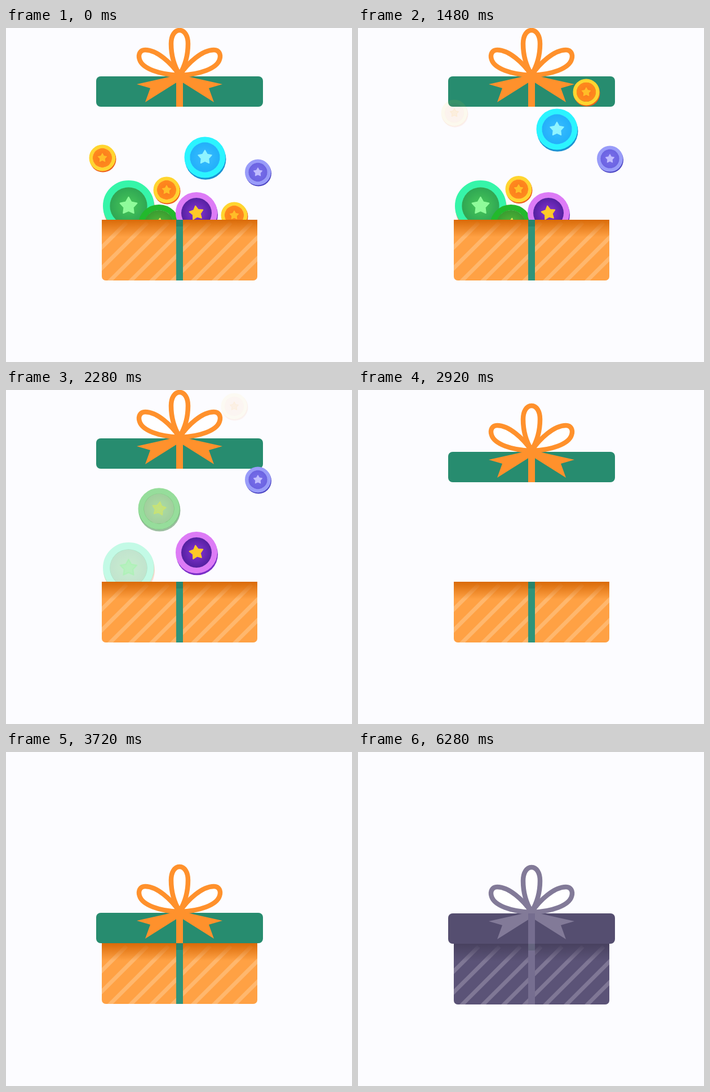
Animation, 614 px wide and 594 px high, one loop 9.08 s. Source, as an HTML page with a canvas:

```html
<!DOCTYPE html>
<html>
<head>
<meta charset="utf-8">
<style>
html, body { margin: 0; width: 100%; height: 100%; overflow: hidden; background: #fcfcff; }
canvas { display: block; }
</style>
</head>
<body>
<canvas id="stage" width="614" height="594"></canvas>
<script>
const ctx = document.getElementById('stage').getContext('2d');
const LOOP = 9080, STEP = 40, CENTER = 308;

// Colour pairs: bright gift, greyed-out gift
const PALETTE = {
  lid: ['#278c6f', '#554e70'], bow: ['#ff912c', '#827a98'], stem: ['#ff912c', '#756d8f'],
  box: ['#ffa144', '#5b5377'], shade: ['#d96a08', '#48415f'],
  stripe: ['#ffb76d', '#7f7795'], ribbon: ['#2f947a', '#766e90']
};

// Rim, ring, outer inner-disc, middle inner-disc, star
const ORANGE = ['#ee5f1c', '#ffd530', '#ff8a1c', '#fa7a20', '#ffbd28'];
const CYAN = ['#1b93d3', '#2bf4ff', '#22b0fa', '#3bbcff', '#8ff4ff'];
const VIOLET = ['#4d46c4', '#999cf9', '#6b63e2', '#7a70ea', '#c0bcff'];
const MINT = ['#f58a5a', '#36f5a9', '#2fa653', '#48c95a', '#8ffb9a'];
const GREEN = ['#2f7a35', '#22b92c', '#3a9c30', '#58bb3c', '#dcea58'];
const PURPLE = ['#7a2fc8', '#dd7bf6', '#5420a0', '#8a35d8', '#ffc928'];

// [skin, x, y, radius, tilt, rise, start, duration, fade start, fade end]
const COINS = [
  [MINT, 217.5, 316.5, 45.5, 0, 0, 0, 1, 2080, 2360],
  [GREEN, 271.5, 351, 37, 0.15, 145, 1500, 900, 2100, 2440],
  [PURPLE, 338, 329, 37, -0.15, 125, 1960, 800, 2480, 2800],
  [ORANGE, 285, 288, 23.5, 0, 120, 1420, 780, 1840, 2200],
  [CYAN, 353, 230, 36.5, 0, 107, 900, 1200, 1700, 2100],
  [ORANGE, 171, 231, 23.5, 0, 80, 120, 1380, 1120, 1510],
  [VIOLET, 447, 256.5, 23, 0, 97, 1080, 1140, 2300, 2720],
  [ORANGE, 405, 333, 23.5, 0, 304, 140, 2140, 1800, 2310]
];

const progress = (t, start, length) => Math.min(1, Math.max(0, (t - start) / length));
const easeInOut = p => p < 0.5 ? 2 * p * p : 1 - 2 * (1 - p) ** 2;
const easeOut = p => 1 - (1 - p) ** 3;

function mix([a, b], k) {
  const channel = (hex, i) => parseInt(hex.slice(i, i + 2), 16);
  return `rgb(${[1, 3, 5].map(i => Math.round(channel(a, i) * (1 - k) + channel(b, i) * k))})`;
}

function disc(x, y, r, fill) {
  ctx.fillStyle = fill;
  ctx.beginPath();
  ctx.arc(x, y, r, 0, 2 * Math.PI);
  ctx.fill();
}

function star(r, color) {
  ctx.beginPath();
  for (let i = 0; i < 10; i++) {
    const a = i * Math.PI / 5 - Math.PI / 2, d = i % 2 ? r * 0.54 : r;
    ctx.lineTo(d * Math.cos(a), d * Math.sin(a));
  }
  ctx.closePath();
  ctx.fillStyle = ctx.strokeStyle = color;
  ctx.lineWidth = r * 0.15;
  ctx.lineJoin = 'round';
  ctx.fill();
  ctx.stroke();
}

// Coins fade as a whole, so the rim is drawn as a crescent beneath the ring
function drawCoin(t, [skin, x, y, r, tilt, rise, start, duration, fadeFrom, fadeTo]) {
  const alpha = 1 - progress(t, fadeFrom, fadeTo - fadeFrom);
  if (!alpha) return;
  const [rim, ring, outer, middle, starColor] = skin;
  ctx.save();
  ctx.globalAlpha = alpha;
  ctx.translate(x, y - rise * easeInOut(progress(t, start, duration)));
  ctx.save();
  ctx.beginPath();
  ctx.rect(-2 * r, -2 * r, 4 * r, 4 * r);
  ctx.arc(0, 0, r - 0.5, 0, 2 * Math.PI);
  ctx.clip('evenodd');
  disc(1, r * 0.09, r, rim);
  ctx.restore();
  ctx.beginPath();
  ctx.arc(0, 0, r * 0.86, 0, 2 * Math.PI);
  ctx.strokeStyle = ring;
  ctx.lineWidth = r * 0.28;
  ctx.stroke();
  const glow = ctx.createRadialGradient(0, 0, 0, 0, 0, r * 0.73);
  glow.addColorStop(0, middle);
  glow.addColorStop(1, outer);
  disc(0, 0, r * 0.73, glow);
  ctx.rotate(tilt);
  star(r * 0.34, starColor);
  ctx.restore();
}

function drawBox(dy, color) {
  ctx.save();
  ctx.translate(0, dy);
  ctx.beginPath();
  ctx.roundRect(170, 341, 276, 108, [0, 0, 7, 7]);
  ctx.clip();
  ctx.fillStyle = color('box');
  ctx.fillRect(170, 341, 276, 108);

  ctx.strokeStyle = color('stripe');
  ctx.lineWidth = 7;
  ctx.beginPath();
  for (let sum = 560; sum < 890; sum += 37) {
    ctx.moveTo(sum - 460, 460);
    ctx.lineTo(sum - 346, 346);
  }
  ctx.stroke();

  const shade = ctx.createLinearGradient(0, 341, 0, 372);
  shade.addColorStop(0, color('shade'));
  shade.addColorStop(1, color('shade').replace('rgb', 'rgba').replace(')', ',0)'));
  ctx.fillStyle = shade;
  ctx.fillRect(170, 341, 276, 31);

  ctx.fillStyle = color('ribbon');
  ctx.fillRect(302, 341, 12, 108);
  ctx.fillStyle = 'rgba(0,40,20,0.15)';
  ctx.fillRect(302, 341, 12, 12);
  ctx.restore();
}

const LOOP_TOP = new Path2D('M308 83C300 70 293 50 293 28C293 14 299 4 308 4C317 4 323 14 323 28C323 50 316 70 308 83Z');
const LOOP_SIDE = new Path2D('M308 84C293 62 268 39 247 39C238 39 234 47 237 56C242 72 272 83 308 84Z');
const TAIL = new Path2D('M308 83L232 100L256 107L247 132L304 96Z');

function drawLid(dy, color) {
  ctx.save();
  ctx.translate(0, dy);
  ctx.fillStyle = color('lid');
  ctx.beginPath();
  ctx.roundRect(160, 86, 296, 54, 8);
  ctx.fill();

  ctx.strokeStyle = color('bow');
  ctx.lineWidth = 8.5;
  ctx.lineJoin = 'round';
  for (const side of [1, -1]) {
    ctx.save();
    ctx.translate(CENTER, 0);
    ctx.scale(side, 1);
    ctx.translate(-CENTER, 0);
    ctx.fillStyle = '#fff';
    ctx.fill(LOOP_SIDE);
    ctx.stroke(LOOP_SIDE);
    ctx.fillStyle = color('bow');
    ctx.fill(TAIL);
    ctx.restore();
  }
  ctx.fillStyle = '#fff';
  ctx.fill(LOOP_TOP);
  ctx.stroke(LOOP_TOP);
  ctx.fillStyle = color('stem');
  ctx.fillRect(302, 86, 12, 54);
  ctx.restore();
}

function draw(t) {
  const drop = easeOut(progress(t, 2880, 960));
  const grey = easeInOut(progress(t, 5480, 800));
  const color = name => mix(PALETTE[name], grey);
  ctx.fillStyle = '#fcfcff';
  ctx.fillRect(0, 0, 614, 594);
  const settle = Math.round(grey);
  const drawTop = () => drawLid(Math.round(200 * drop) + settle, color);
  if (!drop) drawTop();
  COINS.forEach(coin => drawCoin(t, coin));
  drawBox(settle - Math.round(drop), color);
  if (drop) drawTop();
}

const begin = performance.now();
function tick() {
  const t = (performance.now() - begin) % LOOP;
  draw(Math.floor(t / STEP) * STEP);
  requestAnimationFrame(tick);
}
tick();
</script>
</body>
</html>
```
